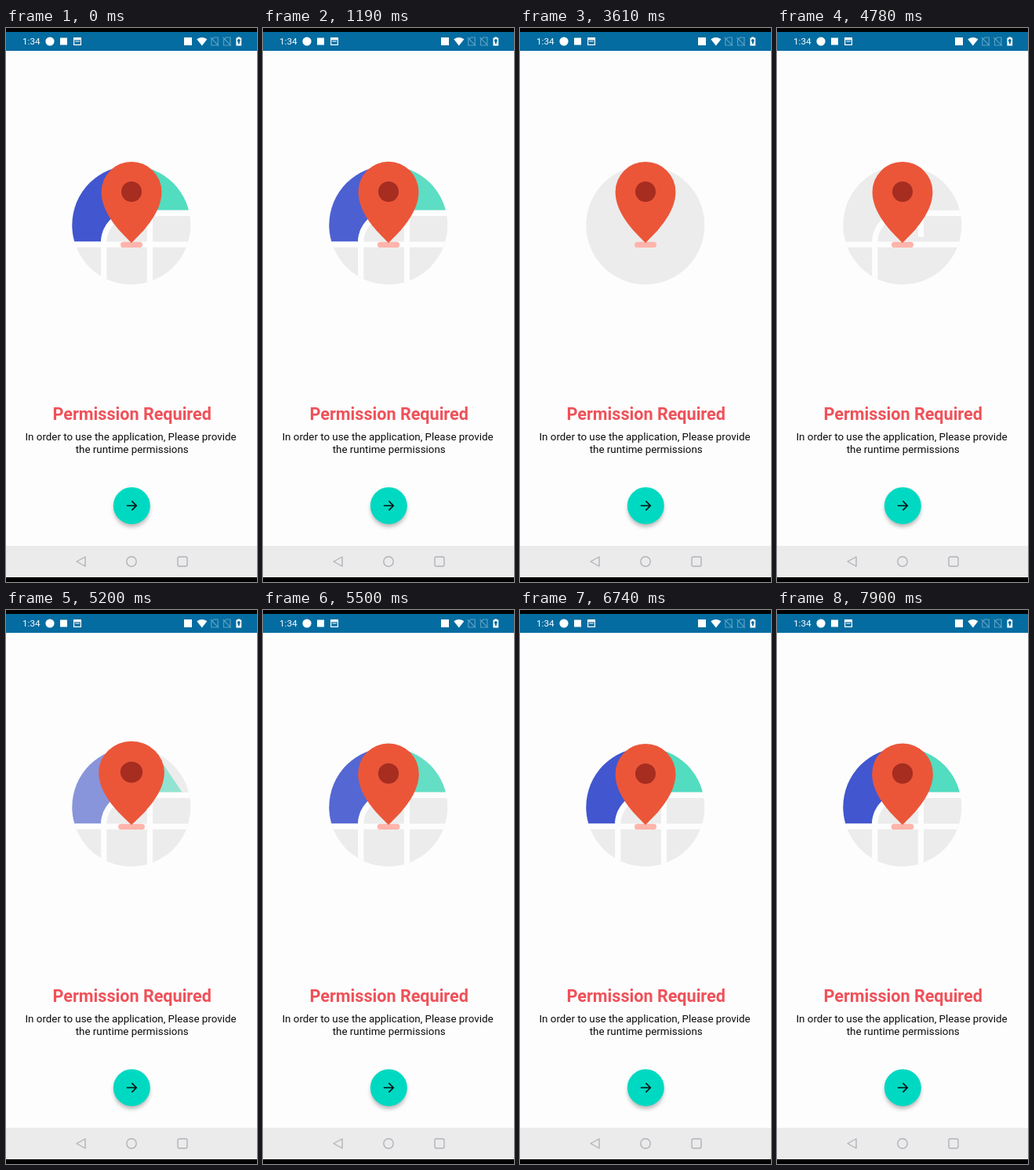
Write an HTML page that moves like this. It is 320x704 px and loops after 8 s.

```html
<!DOCTYPE html>
<html lang="en">
<head>
<meta charset="utf-8">
<title>Permission Required</title>
<style>
  html, body { margin: 0; width: 100%; height: 100%; overflow: hidden; background: #fdfdfd; }
  svg { display: block; width: 320px; height: 704px; }
  text { font-family: Roboto, "Open Sans", sans-serif; }
  .road { fill: none; stroke: #fdfdfd; stroke-width: 7.2; stroke-dasharray: 1 2; }
  .nav { fill: none; stroke: #b2b2ba; stroke-width: 1.4; stroke-linejoin: round; }
</style>
</head>
<body>
<svg viewBox="0 0 320 704">
  <defs>
    <clipPath id="disc"><circle cx="159.8" cy="250.5" r="75.5"/></clipPath>
    <clipPath id="wipe"><path id="wipeEdge"/></clipPath>
    <filter id="blur" x="-30%" y="-30%" width="160%" height="160%"><feGaussianBlur stdDeviation="2.6"/></filter>
  </defs>

  <rect width="320" height="704" fill="#fdfdfd"/>

  <!-- status bar -->
  <rect width="320" height="29" fill="#046ca0"/>
  <rect width="320" height="5" fill="#000"/>
  <text x="21" y="21" font-size="11.7" fill="#fff">1:34</text>
  <g fill="#fff">
    <circle cx="56" cy="17" r="5.6"/>
    <rect x="69" y="12.5" width="9" height="9"/>
    <path fill-rule="evenodd" d="M86 12h10v10H86zM87.2 15.2v5.6h7.6v-5.6zM88.3 16.4h5.4v1.2h-5.4z"/>
    <rect x="227" y="12" width="10" height="10"/>
    <path d="M243.3 14.3Q249.8 9.6 256.3 14.3L249.8 22.5z"/>
    <path fill-rule="evenodd" d="M295.2 11.4h3.2v1.2h1.8v9.8h-6.8v-9.8h1.8zM296.8 14a2 2 0 0 0-1 3.7v2.3h2v-2.3a2 2 0 0 0-1-3.7z"/>
  </g>
  <g fill="none" stroke="#5a9fc4" stroke-width="1.2">
    <path id="sim" d="M265 12h5.2v10h-8.4v-7zM260.8 12l10.4 10.6"/>
    <use href="#sim" x="15.7"/>
  </g>

  <!-- map -->
  <g clip-path="url(#disc)">
    <rect x="80" y="170" width="160" height="160" fill="#ececec"/>
    <g id="areas">
      <path fill="#4156cf" d="M80 271.5H121A41 41 0 0 1 160 231.5V170H80z"/>
      <path fill="#52dcc0" clip-path="url(#wipe)" d="M160 170H240V231.5H160z"/>
    </g>
    <path class="road" id="curve" pathLength="1" d="M237 235.3H162A37.3 37.3 0 0 0 124.7 272.6V328"/>
    <path class="road" id="street" pathLength="1" d="M237 275.2H82"/>
    <path class="road" id="lane" pathLength="1" d="M183.5 237V328"/>
  </g>
  <rect id="base" x="146" y="271.8" width="28" height="7.2" rx="3.6" fill="#ffb4ac"/>
  <g id="pin">
    <path fill="#eb5639" d="M160 273C151 264 121.6 238 121.6 208.3A38.4 38.4 0 0 1 198.4 208.3C198.4 238 169 264 160 273z"/>
    <circle cx="160" cy="208" r="13" fill="#a62d20"/>
  </g>

  <!-- message -->
  <g text-anchor="middle">
    <text x="160.7" y="497.6" font-size="21.6" font-weight="700" fill="#ef5159">Permission Required</text>
    <text font-size="13.35" fill="#0a0a0a">
      <tspan x="160.7" y="524">In order to use the application, Please provide</tspan>
      <tspan x="160.7" y="540">the runtime permissions</tspan>
    </text>
  </g>

  <!-- button -->
  <circle cx="160.3" cy="611" r="23" fill="#777" opacity=".5" filter="url(#blur)"/>
  <circle cx="160.3" cy="607" r="23.5" fill="#00d9c2"/>
  <path d="M153.8 607H166M160.4 601.2L166.2 607L160.4 612.8" fill="none" stroke="#041614" stroke-width="1.7"/>

  <!-- navigation bar -->
  <rect y="658" width="320" height="40" fill="#ebebeb"/>
  <path class="nav" d="M101 672V684L90 678z"/>
  <circle class="nav" cx="160" cy="678" r="6.2"/>
  <rect class="nav" x="219" y="672" width="12" height="12" rx="2"/>
  <rect y="698" width="320" height="6" fill="#000"/>
</svg>
<script>
  const LOOP = 8000, TURN = 3370, BEAT = 1000, FIRST = 240;
  const $ = id => document.getElementById(id);
  const ramp = (t, a, b) => Math.min(1, Math.max(0, (t - a) / (b - a)));
  const ease = (t, a, b) => { const x = ramp(t, a, b); return x * x * (3 - 2 * x); };

  // value at t from [time, value] steps
  function track(t, steps) {
    let v = steps[0][1];
    for (let i = 1; i < steps.length; i++) {
      v += (steps[i][1] - steps[i - 1][1]) * ramp(t, steps[i - 1][0], steps[i][0]);
    }
    return v;
  }

  // one road after the other, then the coloured areas
  const roads = { curve: [FIRST, 740], street: [740, 1240], lane: [1240, 1700] };
  const areaFade = [[1660, 0], [1830, .58], [2180, .93], [2480, 1]];
  const wipeX = [[1660, 178], [1830, 223.5], [2020, 275]];

  function pulse(t) {
    if (t < FIRST) return 0;
    const p = (t - FIRST) % BEAT / BEAT;
    return ease(p, .2, .6) - ease(p, .6, .97);
  }

  function scale(el, x, y, oy) {
    el.setAttribute("transform", `translate(160 ${oy}) scale(${x} ${y}) translate(-160 ${-oy})`);
  }

  function draw(now) {
    // the map plays backwards to the turn, then forwards again
    const t = Math.abs(now % LOOP - TURN);
    for (const id in roads) {
      const done = ease(t, ...roads[id]);
      $(id).style.strokeDashoffset = 1 - done;
      $(id).style.visibility = done > 0 ? "visible" : "hidden";
    }
    $("areas").setAttribute("opacity", track(t, areaFade));
    const x = track(t, wipeX);
    $("wipeEdge").setAttribute("d", `M100 170H${x - 41}L${x + 1} 232H100z`);
    const s = pulse(t);
    scale($("pin"), 1 + .09 * s, 1 + .03 * s, 273);
    scale($("base"), 1 + .21 * s, 1, 275);
  }

  const start = performance.now();
  function tick() {
    draw(performance.now() - start);
    requestAnimationFrame(tick);
  }
  tick();
</script>
</body>
</html>
```
